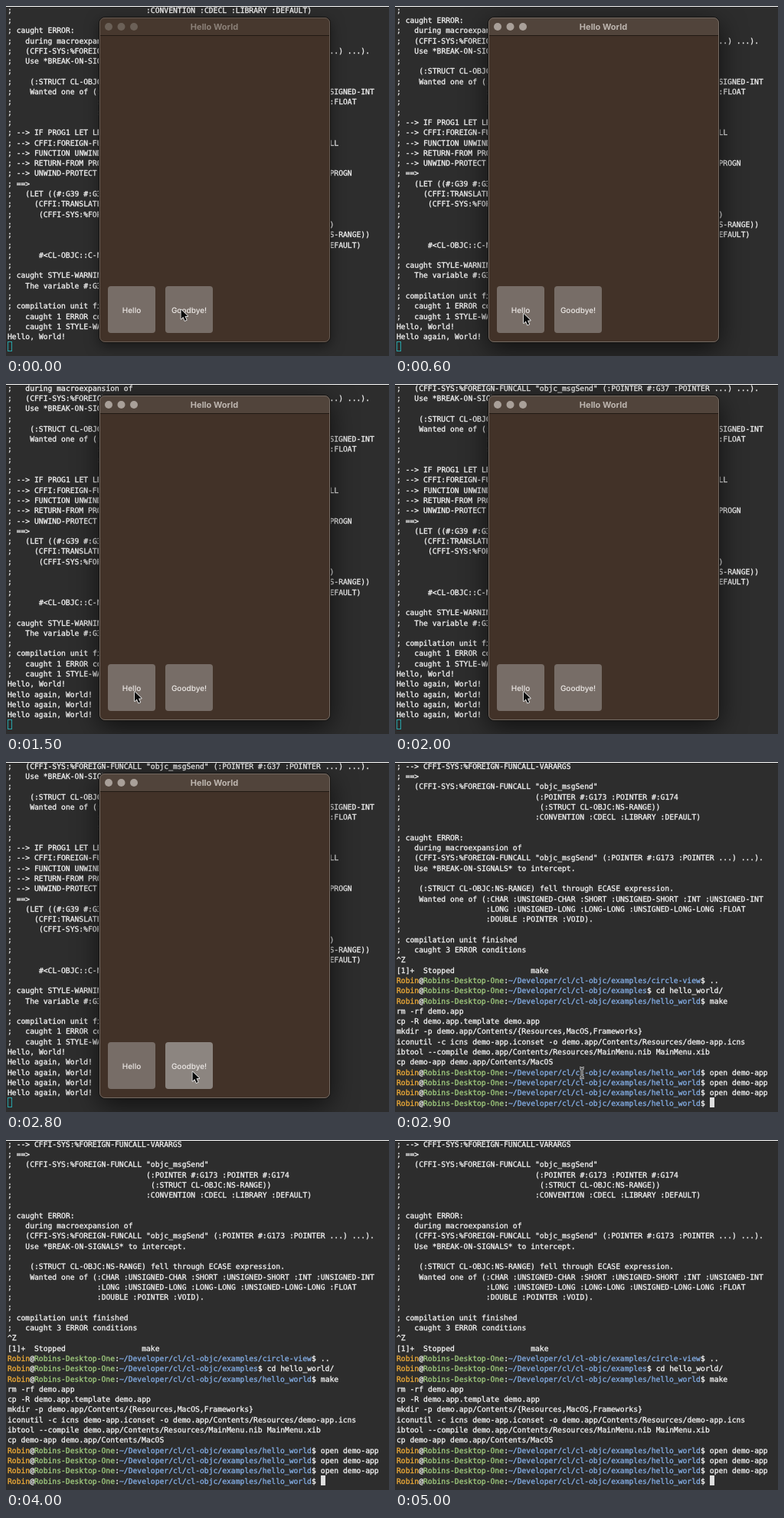
Animation of 500x456 px, one loop 5.1 s. Source, as an HTML page with a canvas:

```html
<!DOCTYPE html>
<html lang="en">
<head>
<meta charset="utf-8">
<title>Hello World demo</title>
<style>
html, body { margin: 0; width: 100%; height: 100%; overflow: hidden; background: #2d2d2d; }
canvas { display: block; }
</style>
</head>
<body>
<canvas id="stage" width="500" height="456"></canvas>
<script>
const ctx = document.getElementById('stage').getContext('2d');
const LOOP = 5100, STEP = 100;
const COL = 5.84, ROW = 13.3, LEFT = 2, LAST_ROW = 33;
const MONO = '9.7px "DejaVu Sans Mono", monospace';
const UI = 'Inter, sans-serif';
const TEXT = '#f4f4f4';

const at = (col, text, start = ';') => start.padEnd(col) + text;
const ecase = [
  at(5, '(:STRUCT CL-OBJC:NS-RANGE) fell through ECASE expression.'),
  at(5, 'Wanted one of (:CHAR :UNSIGNED-CHAR :SHORT :UNSIGNED-SHORT :INT :UNSIGNED-INT'),
  at(20, ':LONG :UNSIGNED-LONG :LONG-LONG :UNSIGNED-LONG-LONG :FLOAT'),
  at(20, ':DOUBLE :POINTER :VOID).'),
  ';'
];
const caught = sym => [
  at(31, ':CONVENTION :CDECL :LIBRARY :DEFAULT)'),
  ';',
  '; caught ERROR:',
  ';   during macroexpansion of',
  `;   (CFFI-SYS:%FOREIGN-FUNCALL "objc_msgSend" (:POINTER ${sym} :POINTER ...) ...).`,
  ';   Use *BREAK-ON-SIGNALS* to intercept.',
  ';',
  ...ecase
];

const appLog = [
  ...caught('#:G37'),
  '; --> IF PROG1 LET LET',
  at(72, 'LL', '; --> CFFI:FOREIGN-FUNCALL'),
  '; --> FUNCTION UNWIND',
  '; --> RETURN-FROM PROG',
  at(72, 'PROGN', '; --> UNWIND-PROTECT'),
  '; ==>',
  ';   (LET ((#:G39 #:G37',
  ';     (CFFI:TRANSLATE',
  ';      (CFFI-SYS:%FOREIGN',
  at(72, ')'),
  at(72, 'S-RANGE))'),
  at(72, 'EFAULT)'),
  ';      #<CL-OBJC::C-N',
  ';',
  '; caught STYLE-WARNING:',
  ';   The variable #:G39',
  ';',
  '; compilation unit fin',
  ';   caught 1 ERROR con',
  ';   caught 1 STYLE-WAR',
  'Hello, World!',
  ...Array(4).fill('Hello again, World!')
];

const prompt = (dir, cmd) => [
  ['Robin', '#f0ac38'], ['@', TEXT], ['Robins-Desktop-One', '#a3cf80'],
  [':', TEXT], ['~/Developer/cl/cl-objc/examples' + dir, '#84aee6'], ['$ ' + cmd, TEXT]
];
const shellLog = [
  '; --> CFFI-SYS:%FOREIGN-FUNCALL-VARARGS',
  '; ==>',
  ';   (CFFI-SYS:%FOREIGN-FUNCALL "objc_msgSend"',
  at(31, '(:POINTER #:G173 :POINTER #:G174'),
  at(32, '(:STRUCT CL-OBJC:NS-RANGE))'),
  ...caught('#:G173'),
  '; compilation unit finished',
  ';   caught 3 ERROR conditions',
  '^Z',
  at(30, 'make', '[1]+  Stopped'),
  prompt('/circle-view', '..'),
  prompt('', 'cd hello_world/'),
  prompt('/hello_world', 'make'),
  'rm -rf demo.app',
  'cp -R demo.app.template demo.app',
  'mkdir -p demo.app/Contents/{Resources,MacOS,Frameworks}',
  'iconutil -c icns demo-app.iconset -o demo.app/Contents/Resources/demo-app.icns',
  'ibtool --compile demo.app/Contents/Resources/MainMenu.nib MainMenu.xib',
  'cp demo-app demo.app/Contents/MacOS',
  ...Array(3).fill(prompt('/hello_world', 'open demo-app')),
  prompt('/hello_world', '')
];

function drawLine(line, row) {
  const parts = typeof line === 'string' ? [[line, TEXT]] : line;
  const y = 8.6 + row * ROW;
  let col = 0;
  for (const [text, color] of parts) {
    ctx.fillStyle = ctx.strokeStyle = color;
    for (const word of text.matchAll(/\S+/g)) {
      const x = LEFT + (col + word.index) * COL;
      ctx.fillText(word[0], x, y);
      ctx.strokeText(word[0], x, y);
    }
    col += text.length;
  }
}

function drawTerminal(lines) {
  ctx.fillStyle = '#2d2d2d';
  ctx.fillRect(0, 0, 500, 456);
  ctx.font = MONO;
  ctx.textRendering = 'geometricPrecision';
  ctx.textAlign = 'left';
  ctx.textBaseline = 'alphabetic';
  ctx.lineWidth = 0.3; // thickens the strokes a little
  lines.forEach(drawLine);
  ctx.fillStyle = '#fff';
  ctx.fillRect(0, 0, 500, 1);
}

function box(x, y, w, h, r) {
  ctx.beginPath();
  ctx.roundRect(x, y, w, h, r);
}

function label(text, x, y, font, color) {
  ctx.font = `${font} ${UI}`;
  ctx.textAlign = 'center';
  ctx.textBaseline = 'alphabetic';
  ctx.fillStyle = color;
  ctx.fillText(text, x, y);
}

function button(text, x, pressed) {
  ctx.fillStyle = pressed ? '#8c8580' : '#776d67';
  box(x, 365, 62, 61, 4);
  ctx.fill();
  label(text, x + 31, 399.5, '500 10px', '#eeeae7');
}

function drawWindow(active, press) {
  ctx.save();
  ctx.shadowColor = `rgba(0,0,0,${active ? 0.65 : 0.5})`;
  ctx.shadowBlur = active ? 34 : 18;
  ctx.shadowOffsetY = active ? 9 : 5;
  ctx.fillStyle = '#423228';
  box(122, 15, 301, 423, 7);
  ctx.fill();
  ctx.restore();

  ctx.fillStyle = active ? '#51443b' : '#47382e';
  box(122, 15, 301, 24, [7, 7, 0, 0]);
  ctx.fill();
  ctx.fillStyle = '#211913';
  ctx.fillRect(122, 38, 301, 1);

  ctx.lineWidth = 1;
  ctx.strokeStyle = '#151311';
  box(121.5, 14.5, 302, 424, 7.5);
  ctx.stroke();
  ctx.strokeStyle = active ? '#746b64' : '#665b53';
  box(122.5, 15.5, 300, 422, 6.5);
  ctx.stroke();

  ctx.fillStyle = active ? '#a9a099' : '#6b6057';
  for (const x of [134, 150.5, 167]) {
    ctx.beginPath();
    ctx.arc(x, 27, 5, 0, Math.PI * 2);
    ctx.fill();
  }
  label('Hello World', 272, 30.5, 'bold 11px', active ? '#bdb5af' : '#8b8078');
  button('Hello', 133, press === 'Hello');
  button('Goodbye!', 208, press === 'Goodbye!');
}

function arrow(x, y) {
  ctx.save();
  ctx.translate(x, y);
  ctx.beginPath();
  [[0, 0], [0, 12.2], [2.8, 9.6], [5, 14.4], [7.2, 13.4], [5, 8.8], [8.8, 8.6]]
    .forEach(p => ctx.lineTo(...p));
  ctx.closePath();
  ctx.lineJoin = 'round';
  ctx.lineWidth = 1.6;
  ctx.strokeStyle = '#f2f2f2';
  ctx.stroke();
  ctx.fillStyle = '#0a0a0a';
  ctx.fill();
  ctx.restore();
}

function beam(x, y) {
  for (const [width, color] of [[3, '#c8c8c8'], [1.1, '#3a3a3a']]) {
    ctx.lineWidth = width;
    ctx.strokeStyle = color;
    ctx.beginPath();
    for (const s of [-1, 1]) {
      ctx.moveTo(x - 3, y + 6.5 * s);
      ctx.quadraticCurveTo(x, y + 6.5 * s, x, y + 4 * s);
      ctx.quadraticCurveTo(x, y + 6.5 * s, x + 3, y + 6.5 * s);
    }
    ctx.moveTo(x, y - 4);
    ctx.lineTo(x, y + 4);
    ctx.stroke();
  }
}

const within = (t, a, b) => t >= a && t < b;
const mix = (a, b, k) => a + (b - a) * k;
function ease(t, a, b) {
  const k = Math.min(1, Math.max(0, (t - a) / (b - a)));
  return k * k * (3 - 2 * k);
}

function pointer(t) {
  const left = ease(t, 0, 400), right = ease(t, 2200, 2500);
  return [
    mix(mix(228.5, 168, left), 243.5, right),
    mix(mix(395.5, 401, left), 403.5, right)
  ];
}

function pressed(t) {
  if (within(t, 2800, 2900)) return 'Goodbye!';
  return [1000, 1400, 1900].some(s => within(t, s, s + 100)) ? 'Hello' : '';
}

function drawApp(t) {
  const prints = [600, 1100, 1500, 2000].filter(s => t >= s).length;
  drawTerminal(appLog.slice(prints, prints + LAST_ROW));
  ctx.lineWidth = 1;
  ctx.strokeStyle = '#27a3a8';
  ctx.strokeRect(2.5, 437.5, 5, 12);
  drawWindow(t >= 100, pressed(t));
  arrow(...pointer(t));
}

function drawShell(t) {
  drawTerminal(shellLog);
  ctx.fillStyle = '#dedede';
  ctx.fillRect(411, 437, 6, 13);
  if (t < 3400) beam(244, 405);
}

const start = performance.now();
function frame() {
  const t = Math.floor(((performance.now() - start) % LOOP) / STEP) * STEP;
  if (t < 2900) drawApp(t);
  else drawShell(t);
  requestAnimationFrame(frame);
}
frame();
</script>
</body>
</html>
```
